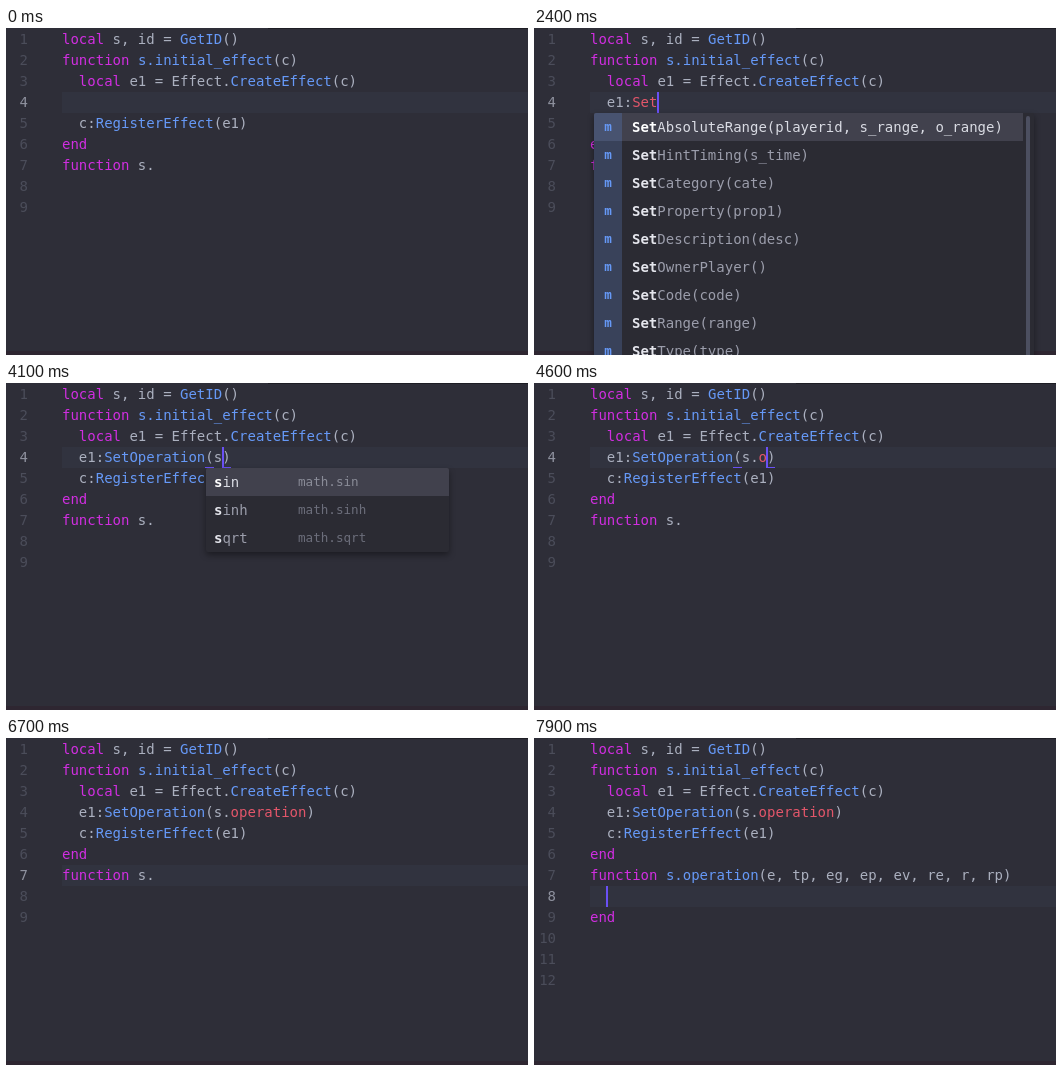
Write an HTML page that moves like this. It is 522 px wide and 327 px high and loops after 8000 ms.

```html
<!DOCTYPE html>
<html lang="en">
<head>
<meta charset="utf-8">
<title>Code completion</title>
<style>
  html, body { margin: 0; width: 100%; height: 100%; overflow: hidden; background: #2e2e38; }
  #stage {
    position: relative; width: 522px; height: 327px; overflow: hidden;
    background: #2e2e38; color: #abb0bf;
    font: 14px/21px "DejaVu Sans Mono", monospace; white-space: pre;
  }
  #stage div, #stage i { position: absolute; font-style: normal; }
  .edge { left: 262px; right: 0; top: 0; height: 1px; background: #1d1d24; }
  .foot { left: 0; right: 0; bottom: 0; height: 4px; background: #2e2631; }
  .active { left: 56px; right: 0; height: 21px; background: #31333f; }
  .num { right: 500px; color: #4b4d5a; }
  .num.on { color: #8f929f; }
  .code { left: 56px; }
  .k { color: #d02ee0; }
  .f { color: #6699f7; }
  .r { color: #e3566a; }
  .caret { width: 2px; height: 21px; background: #6a50f5; }
  .pair { width: 9px; height: 1px; background: #6a50f5; }
  .pop { background: #2b2b33; box-shadow: 0 3px 6px rgba(0, 0, 0, .4); border-radius: 2px; overflow: hidden; }
  .row { left: 0; height: 28px; line-height: 28px; color: #9b9dab; }
  .row.on { background: #41414d; color: #d9dbe3; }
  .row b { color: #e4e5ec; }
  .row.on b { color: #fff; }
  .icon { left: 0; top: 0; width: 28px; height: 28px; background: #39425a; color: #6699f7; font: bold 12.6px/28px "DejaVu Sans Mono", monospace; text-align: center; }
  .on .icon { background: #485370; }
  .type, .side { top: 0; font-size: 12.6px; color: #6c6e7b; }
  .on .side { color: #8a8c98; }
  .bar { top: 3px; right: 4px; width: 4px; bottom: 3px; border-radius: 2px; background: #4c4f60; }
</style>
</head>
<body>
<div id="stage"></div>
<script>
const CH = 8.428, LEFT = 56, ROW = 21, ITEM = 28, LOOP = 8000;
const stage = document.getElementById("stage");
const top1 = n => 1 + ROW * (n - 1);
const colX = c => LEFT + CH * c;

// Completion lists; "type|label|side" with optional outer parts.
const setters = "SetAbsoluteRange(playerid, s_range, o_range),,SetHintTiming(s_time),,SetCategory(cate),,SetProperty(prop1),,SetDescription(desc),,SetOwnerPlayer()";
const lists = {
  word: ["e1"],
  members: ["SetAbsoluteRange(playerid, s_range, o_range)", "SetHintTiming(s_time)", "number|GetFieldID()",
    "SetCategory(cate)", "Reset()", "SetProperty(prop1)", "SetDescription(desc)",
    "boolean|IsActivatable(player)", "number|GetCategory()", "SetOwnerPlayer()"],
  early: (setters + ",,SetType(type),,SetRange(range),,SetCode(code),,SetValue(val)").split(",,"),
  set: (setters + ",,SetCode(code),,SetRange(range),,SetType(type),,SetValue(val)").split(",,"),
  seto: ["SetOwnerPlayer()", "SetOperation(op_func)", "SetProperty(prop1)", "SetCode(code)", "SetDescription(desc)"],
  setop: ["SetOperation(op_func)", "SetOwnerPlayer()", "SetProperty(prop1)"],
  math: ["|sin|math.sin", "|sinh|math.sinh", "|sqrt|math.sqrt"],
  field: ["initial_effect(c)"],
  oper: ["SetOperation"],
  funcs: ["operation", "SetOperation", "GetOperation", "SetProperty", "GetProperty", "IsProperty", "SetOwnerPlayer", "GetOwnerPlayer"]
};

const pop = (list, col, match = "", icon = true) => ({ list, col, match, icon });
const steps = [];
let now = { four: "", seven: "function s.", line: 4, caret: true, pop: null, done: false };
const at = (t, change) => steps.push(now = { ...now, caret: true, ...change, t });
const blink = t => at(t, { caret: false });
const type4 = (t, text, p = null, col) => at(t, { four: "  " + text, pop: p, col: col ?? text.length + 2 });

at(0, { col: 2, caret: false });
type4(300, "e", pop("word", 2, "e", false));
type4(400, "e1", pop("word", 2, "e1", false));
type4(600, "e1", pop("word", 2, "e1"));
type4(900, "e1:", pop("members", 5));
blink(1200);
type4(1600, "e1:S", pop("early", 5, "S"));
type4(1900, "e1:Se", pop("early", 5, "S"));
type4(2000, "e1:Se", pop("early", 5, "Se"));
blink(2200);
type4(2400, "e1:Set", pop("set", 5, "Set"));
type4(2700, "e1:SetO", pop("seto", 5, "SetO"));
type4(2800, "e1:SetOp", pop("setop", 5, "SetOp"));
blink(3100);
const call = (t, arg, p) => type4(t, `e1:SetOperation(${arg})`, p, 18 + arg.length);
call(3400, "op_func");
blink(3700);
call(4100, "s", pop("math", 18, "s", false));
call(4300, "s.", pop("field", 20));
call(4600, "s.o");
[2, 3, 4, 6, 7, 9].forEach((n, i) => {
  const word = "operation".slice(0, n);
  call(4800 + i * 100, "s." + word, pop("oper", 20, word, false));
});
blink(5700);
at(6000, { pop: null });
at(6100, { line: 5, col: 22 });
at(6300, { line: 6, col: 3 });
at(6400, { line: 7, col: 11 });
blink(6700);
["o", "op", "ope"].forEach((w, i) =>
  at(7000 + i * 100, { seven: "function s." + w, col: 11 + w.length, pop: pop("funcs", 11, w) }));
blink(7500);
at(7900, { seven: "function s.operation(e, tp, eg, ep, ev, re, r, rp)", done: true, line: 8, col: 2, pop: null });

const box = (cls, style, html = "") => `<div class="${cls}" style="${style}">${html}</div>`;

const paint = text => text.replace(
  /\b(local|function|end)\b|(?<=function )s\.\w+(?=\()|\w+(?=\()|(?<=[.:])\w+/g,
  (word, key, pos) => {
    const cls = key ? "k" : text[pos + word.length] === "(" ? "f" : "r";
    return `<span class="${cls}">${word}</span>`;
  });

// Bold the typed letters: a whole run if there is one, else in sequence.
function mark(label, match) {
  if (!match) return label;
  const low = label.toLowerCase(), m = match.toLowerCase(), p = low.indexOf(m);
  if (p >= 0) return label.slice(0, p) + `<b>${label.slice(p, p + m.length)}</b>` + label.slice(p + m.length);
  let k = 0;
  return [...label].map((c, i) => low[i] === m[k] ? (k++, `<b>${c}</b>`) : c).join("");
}

function drawPop({ list, col, match, icon }, line) {
  const items = lists[list].map(s => s.includes("|") ? s.split("|") : ["", s]);
  const typed = list === "members", long = items.length > 9;
  const x = Math.round(colX(col)) - (icon ? 38 : 8);
  const left = typed ? -4 : x;
  const right = long ? (typed ? 499 : 500) : x + 243;
  const width = right - left;
  const pad = Math.round(colX(col)) - left;
  const rows = items.map(([kind, label, side], i) => box("row" + (i ? "" : " on"),
    `top:${i * ITEM}px;width:${width - (long ? 11 : 0)}px`,
    (icon ? `<i class="icon">m</i>` : "") +
    (kind ? `<i class="type" style="right:${width - 11 - 93}px">${kind}</i>` : "") +
    `<i style="left:${pad}px">${mark(label, match)}</i>` +
    (side ? `<i class="side" style="left:92px">${side}</i>` : "")));
  return box("pop", `left:${left}px;top:${top1(line + 1)}px;width:${width}px;height:${items.length * ITEM}px`,
    rows.join("") + (long ? box("bar", "") : ""));
}

function draw(s) {
  const lines = ["local s, id = GetID()", "function s.initial_effect(c)", "  local e1 = Effect.CreateEffect(c)",
    s.four, "  c:RegisterEffect(e1)", "end", s.seven, "", s.done ? "end" : ""];
  if (s.done) lines.push("", "", "");
  let html = box("edge", "") + box("foot", "") + box("active", `top:${top1(s.line)}px`);
  lines.forEach((text, i) => {
    const y = `top:${top1(i + 1)}px`;
    html += box("num" + (i + 1 === s.line ? " on" : ""), y, i + 1) + box("code", y, paint(text));
  });
  const current = lines[s.line - 1];
  if (current.includes("("))
    for (const c of "()")
      html += box("pair", `left:${Math.floor(colX(current.indexOf(c)))}px;top:${top1(s.line) + 20}px`);
  if (s.caret) html += box("caret", `left:${Math.floor(colX(s.col))}px;top:${top1(s.line)}px`);
  if (s.pop) html += drawPop(s.pop, s.line);
  stage.innerHTML = html;
}

let shown;
function tick() {
  const t = performance.now() % LOOP;
  const s = steps.findLast(step => step.t <= t);
  if (s !== shown) draw(shown = s);
  requestAnimationFrame(tick);
}
tick();
</script>
</body>
</html>
```
